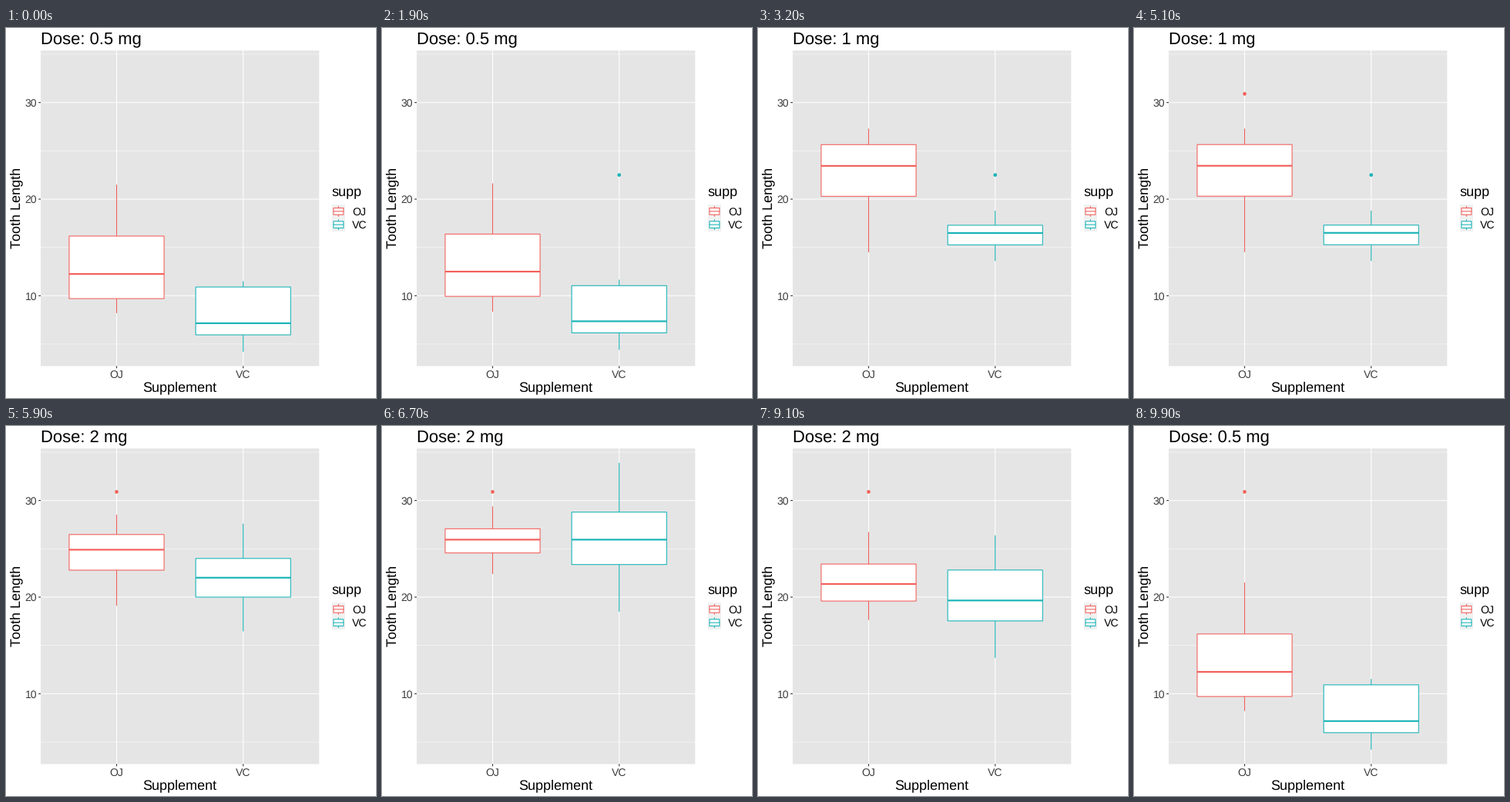
These frames come from a looping animation (480 px wide and 480 px high, 10 s). A matplotlib script:

```python
import matplotlib.pyplot as plt
from matplotlib.animation import FuncAnimation
from matplotlib.patches import Circle, Rectangle

plt.rcParams["font.family"] = "Liberation Sans"
plt.rcParams["text.hinting"] = "none"
plt.rcParams["text.hinting_factor"] = 1
plt.rcParams["toolbar"] = "None"

SIZE = 480
FRAMES = 100
LEFT, RIGHT, TOP, BOTTOM = 45.0, 406.2, 29.2, 438.6
LINE = 1.07
COLORS = {"OJ": "#f35e5a", "VC": "#17b3b7"}
UNIT = (RIGHT - LEFT) / 2.2
CENTERS = {"OJ": LEFT + 0.6 * UNIT, "VC": LEFT + 1.6 * UNIT}
HALF = 0.375 * UNIT

DOSES = ["0.5", "1", "2"]
# low whisker, lower hinge, median, upper hinge, high whisker
STATS = {
    "OJ": [(8.2, 9.7, 12.25, 16.175, 21.5),
           (14.5, 20.3, 23.45, 25.65, 27.3),
           (22.4, 24.575, 25.95, 27.075, 29.4)],
    "VC": [(4.2, 5.95, 7.15, 10.9, 11.5),
           (13.6, 15.275, 16.5, 17.3, 18.8),
           (18.5, 23.375, 25.95, 28.8, 33.9)],
}
# value of the outlier and the state that has it
OUTLIERS = {"OJ": (30.9, 2), "VC": (22.5, 1)}
# start and end frame of each transition
MOVES = [(16, 33), (50, 67), (84, 100)]


def ypos(value):
    return BOTTOM - (value - 2.715) * (BOTTOM - TOP) / 32.67


def ease(p):
    return 4 * p ** 3 if p < 0.5 else 1 - 4 * (1 - p) ** 3


fig = plt.figure(figsize=(SIZE / 72, SIZE / 72), dpi=72, facecolor="white")
ax = fig.add_axes([0, 0, 1, 1])
ax.set_xlim(0, SIZE)
ax.set_ylim(SIZE, 0)
ax.axis("off")


def line(xs, ys, color, width=LINE, z=1):
    item, = ax.plot(xs, ys, color=color, lw=width, zorder=z,
                    solid_capstyle="butt", snap=False)
    return item


def rect(x, y, w, h, fill, edge="none", z=0):
    item = Rectangle((x, y), w, h, facecolor=fill, edgecolor=edge,
                     lw=LINE if edge != "none" else 0,
                     joinstyle="miter", zorder=z, snap=False)
    return ax.add_patch(item)


def label(x, y, text, size, color="black", **kw):
    return ax.text(x, y, text, fontsize=size, color=color,
                   va="baseline", zorder=8, **kw)


def draw_panel():
    rect(LEFT, TOP, RIGHT - LEFT, BOTTOM - TOP, "#e5e5e5")
    for value in (5, 15, 25, 35):
        line([LEFT, RIGHT], [ypos(value)] * 2, "white", LINE / 2)
    for value in (10, 20, 30):
        y = ypos(value)
        line([LEFT, RIGHT], [y, y], "white")
        line([LEFT - 2.75, LEFT], [y, y], "#262626")
        label(40, y + 5.1, str(value), 14.4, "#3d3d3d", ha="right")
    for name, x in CENTERS.items():
        line([x, x], [TOP, BOTTOM], "white")
        line([x, x], [BOTTOM, BOTTOM + 2.75], "#262626")
        label(x, 453.9, name, 14.4, "#3d3d3d", ha="center")
    label((LEFT + RIGHT) / 2, 471.4, "Supplement", 18, ha="center")
    ax.text(18.4, (TOP + BOTTOM) / 2, "Tooth Length", fontsize=18,
            rotation=90, rotation_mode="anchor", ha="center", va="baseline")


def draw_legend():
    key, x, y = 17.28, 422.7, 229.2
    label(x, 218, "supp", 18)
    for name, color in COLORS.items():
        mid = x + key / 2
        rect(x, y, key, key, "#f0f0f0")
        for a, b in ((0.1, 0.25), (0.75, 0.9)):
            line([mid, mid], [y + a * key, y + b * key], color, z=2)
        rect(x + key / 8, y + key / 4, 0.75 * key, key / 2, "white", color, 3)
        line([x + key / 8, x + 0.875 * key], [y + key / 2] * 2, color, z=4)
        label(449, y + key / 2 + 5.1, name, 14.4)
        y += key


class Box:
    def __init__(self, name):
        self.name = name
        self.x = CENTERS[name]
        color = COLORS[name]
        value, self.state = OUTLIERS[name]
        self.dot = ax.add_patch(Circle((self.x, ypos(value)), 2.3, fc=color,
                                       ec="none", zorder=2))
        self.low = line([self.x] * 2, [0, 0], color, z=3)
        self.high = line([self.x] * 2, [0, 0], color, z=3)
        self.body = rect(self.x - HALF, 0, 2 * HALF, 1, "white", color, 4)
        self.median = line([self.x - HALF, self.x + HALF], [0, 0],
                           color, 2 * LINE, 5)

    def update(self, old, new, t):
        pairs = zip(STATS[self.name][old], STATS[self.name][new])
        low, q1, med, q3, high = [ypos(a + (b - a) * t) for a, b in pairs]
        self.low.set_ydata([low, q1])
        self.high.set_ydata([q3, high])
        self.body.set_y(q3)
        self.body.set_height(q1 - q3)
        self.median.set_ydata([med, med])
        # an outlier stays for the whole of any transition it takes part in
        self.dot.set_visible(self.state in (old, new))


def state_at(frame):
    """Return previous state, next state, eased progress, nearest state."""
    current = 0
    for i, (start, end) in enumerate(MOVES):
        if start < frame < end:
            new = (i + 1) % 3
            late = frame - start > (end - start) // 2
            t = ease((frame - start) / (end - start))
            return i, new, t, new if late else i
        if frame >= end:
            current = (i + 1) % 3
    return current, current, 0, current


draw_panel()
draw_legend()
title = label(LEFT, 20.9, "", 21.6)
boxes = [Box(name) for name in COLORS]


def update(frame):
    old, new, t, nearest = state_at(frame)
    title.set_text(f"Dose: {DOSES[nearest]} mg")
    for box in boxes:
        box.update(old, new, t)
    return []


anim = FuncAnimation(fig, update, frames=FRAMES, interval=100,
                     init_func=lambda: update(0), repeat=True,
                     repeat_delay=0, blit=False)
plt.show()
```
